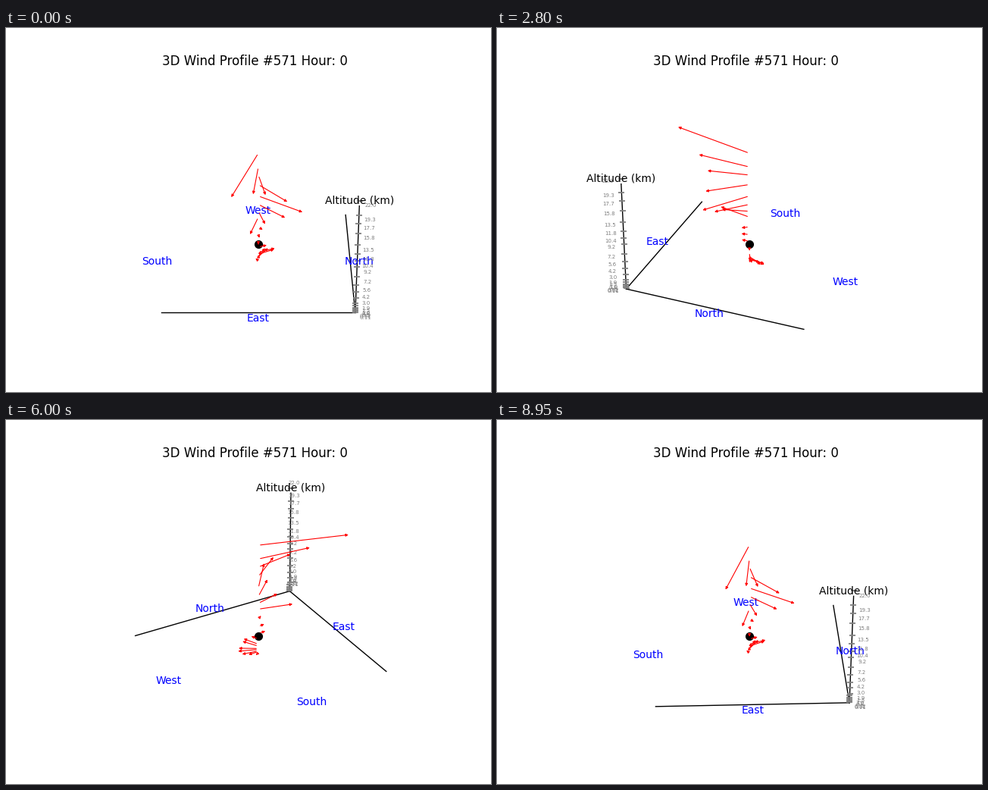
Write a matplotlib script that moves like this. It is 640x480 px and loops after 9 s.

```python
import numpy as np
import matplotlib.pyplot as plt
from matplotlib.animation import FuncAnimation
from matplotlib.patches import FancyArrowPatch

W, H, DPI = 640, 480, 100
FRAMES, INTERVAL = 180, 50
ELEV, DIST = np.radians(30), 10
SCALE, CX, CY = 369.6 / 0.185, 333.0, 237.8   # pixels per unit, view centre
R = 0.619                                     # half side of the floor
RING = 1.1 * R                                # where the labels sit
KM = 0.0374                                   # box units per kilometre

LEVELS = [0.11, 0.32, 0.5, 0.8, 1.0, 1.5, 1.9, 3.0, 4.2, 5.6,
          7.2, 9.2, 10.4, 11.8, 13.5, 15.8, 17.7, 19.3, 22.0]
# turning points of the wind: altitude, eastward, northward
WIND_KEYS = [(0, 0, -0.03), (0.5, -0.13, 0.02), (1.5, -0.07, 0.12),
             (3, -0.03, 0.07), (4.2, 0.07, 0), (7.2, 0.055, 0.04),
             (9.2, 0.245, -0.06), (10.4, 0.19, 0.05), (13.5, 0.22, 0.297),
             (17.7, 0.29, 0.05), (22, 0.598, -0.173)]


def smooth(x, xs, ys):
    """Smooth cubic curve through the points (xs, ys)."""
    slopes = np.gradient(ys, xs)
    i = np.clip(np.searchsorted(xs, x) - 1, 0, len(xs) - 2)
    step = xs[i + 1] - xs[i]
    t = (x - xs[i]) / step
    ease = t * t * (3 - 2 * t)
    bend = t * (1 - t) * ((1 - t) * slopes[i] - t * slopes[i + 1])
    return ys[i] + (ys[i + 1] - ys[i]) * ease + step * bend


def project(x, y, alt, az):
    """Perspective view of a point, in pixels from the top left."""
    z = (alt - 11) * KM
    right = y * np.cos(az) - x * np.sin(az)
    near = x * np.cos(az) + y * np.sin(az)
    up = z * np.cos(ELEV) - near * np.sin(ELEV)
    depth = DIST - near * np.cos(ELEV) - z * np.sin(ELEV)
    return CX + SCALE * right / depth, CY - SCALE * up / depth


alts = np.array(LEVELS)
key_alt, key_east, key_north = np.array(WIND_KEYS, float).T
east = smooth(alts, key_alt, key_east)
north = smooth(alts, key_alt, key_north)

fig = plt.figure(figsize=(W / DPI, H / DPI), dpi=DPI, facecolor="white")
ax = fig.add_axes([0, 0, 1, 1])
ax.set(xlim=(0, W), ylim=(H, 0))
ax.axis("off")
ax.text(328, 49.3, "3D Wind Profile #571 Hour: 0", size=12, ha="center")

# three edges meeting in the north-east corner, each as (x, y, altitude)
edges = [np.array([(R, R, 0), end]).T
         for end in [(R, -R, 0), (-R, R, 0), (R, R, 21)]]
edge_lines = [ax.plot([], [], color="black", lw=1)[0] for _ in edges]
ticks, = ax.plot([], [], ls="", marker="_", ms=5.5, mew=1.3, color="gray")

labels = []


def add_label(text, pos, color, size=10):
    artist = ax.text(0, 0, text, ha="center", va="center",
                     color=color, size=size)
    labels.append((artist, pos))


for k, name in enumerate(["East", "North", "West", "South"]):
    angle = k * np.pi / 2
    add_label(name, (RING * np.cos(angle), RING * np.sin(angle), 0), "blue")
for alt in LEVELS:
    add_label(str(alt), (RING, RING, alt), "gray", 5)
add_label("Altitude (km)", (R, R, 22), "black")

ax.plot([CX], [285.2], "o", color="black", ms=7, zorder=4)
arrows = [ax.add_patch(FancyArrowPatch((0, 0), (1, 1), arrowstyle="-|>",
                                       mutation_scale=5, lw=0.8,
                                       color="red", zorder=5))
          for _ in LEVELS]


def draw(i):
    az = 2 * np.pi * i / FRAMES
    for line, points in zip(edge_lines, edges):
        line.set_data(*project(*points, az))
    ticks.set_data(*project(R, R, alts, az))
    for artist, pos in labels:
        artist.set_position(project(*pos, az))
    for arrow, alt, u, v in zip(arrows, alts, east, north):
        arrow.set_positions(project(0, 0, alt, az), project(u, v, alt, az))
    return []


anim = FuncAnimation(fig, draw, frames=FRAMES, interval=INTERVAL,
                     repeat=True, repeat_delay=0)
plt.show()
```
